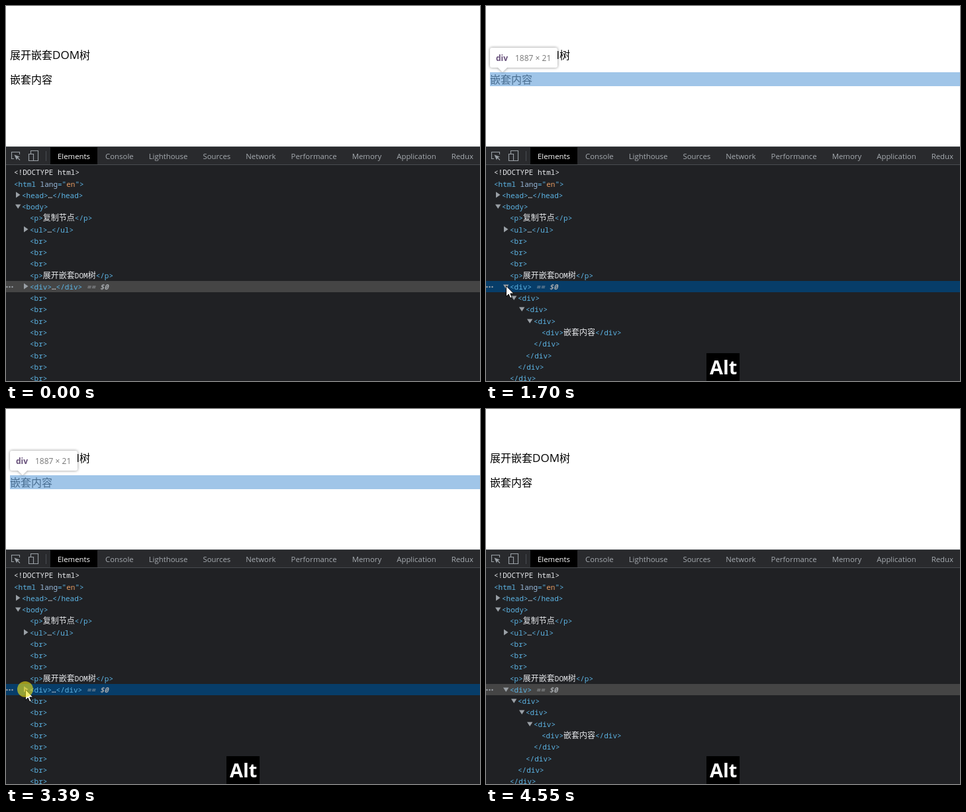
Write an HTML page that moves like this. It is 716x566 px and loops after 4600 ms.

```html
<!DOCTYPE html>
<html lang="zh-CN">
<head>
<meta charset="utf-8">
<style>
  html, body { margin: 0; width: 100%; height: 100%; overflow: hidden; background: #fff; }
  svg { display: block; width: 716px; height: 566px; }
  text { white-space: pre; }
  .page { font: 16px "Noto Sans CJK SC", "Noto Sans CJK", sans-serif; fill: #000; }
  .dom { font: 17px "Open Sans", sans-serif; }
  .tab { font: 11.4px "Open Sans", sans-serif; fill: #a6abb0; }
  .tab:first-child { fill: #fff; }
  .code { font: 11px "Noto Sans Mono", monospace; fill: #5cb4e4; }
  .cjk { font: 12px "Noto Sans CJK SC", "Noto Sans CJK", sans-serif; }
  .plain, .cjk { fill: #e8eaed; }
  .attr { fill: #9bbbdc; }
  .value { fill: #e39a62; }
  .ref { fill: #a3a7ab; font-style: italic; }
  .arrow { fill: #9aa0a6; }
  .tip { font: 12px "Open Sans", sans-serif; fill: #777; }
</style>
</head>
<body>
<svg viewBox="0 0 716 566">
  <text class="page" x="6" y="80">展开嵌套<tspan class="dom">DOM</tspan>树</text>
  <text class="page" x="6" y="117">嵌套内容</text>

  <g id="overlay">
    <rect x="6" y="100" width="710" height="21" fill="#6fa8dc" fill-opacity=".66"/>
    <g fill="#fff" style="filter:drop-shadow(0 0 2px rgba(0,0,0,.45))">
      <rect x="6" y="63" width="102" height="30" rx="3"/>
      <path d="M18 93H32L25 100Z"/>
    </g>
    <text class="tip" x="15" y="83" style="font-weight:700;fill:#67507a">div</text>
    <text class="tip" x="44" y="83">1887 × 21</text>
  </g>

  <rect y="212" width="716" height="354" fill="#202124"/>
  <rect y="212" width="716" height="28" fill="#292a2d"/>
  <path d="M0 212.5H716M0 239.5H716M60.5 219V234" stroke="#494c50"/>
  <rect x="67" y="213" width="71" height="26" fill="#000"/>
  <g fill="none" stroke="#9aa0a6" stroke-width="1.1">
    <path d="M12 230.5H8.5V220.5H20.5V224M16.5 228L21 232.5"/>
    <path d="M12.5 224.5L21 227.5L17.5 229L16 232.5Z" fill="#9aa0a6" stroke="none"/>
    <path d="M37.5 223V218.5H48.5V233.5H42M34.5 223.5H41.5V233.5H34.5Z"/>
  </g>
  <g id="tabs"></g>

  <rect id="hover" x="1" width="715" height="17" fill="#202a3a"/>
  <rect id="selected" y="415" width="716" height="17"/>
  <path d="M1.5 424h9" stroke="#9aa0a6" stroke-width="2.4" stroke-linecap="round" stroke-dasharray="0 4"/>
  <g id="tree"></g>
  <g id="closed"></g>
  <g id="open"></g>

  <g id="key">
    <rect x="333" y="524" width="50" height="42" fill="#000"/>
    <text x="338" y="556" fill="#fff" style="font:700 29px 'Open Sans',sans-serif">Alt</text>
  </g>
  <g id="cursor">
    <path d="M.5 .5V16.5L4.2 13L6.7 18.8L9.2 17.7L6.8 12H11.8Z" fill="#fff" stroke="#000" stroke-width=".9"/>
    <circle id="press" r="12" fill="#ebe119" fill-opacity=".62"/>
  </g>
</svg>
<script>
const $ = id => document.getElementById(id);
const LOOP = 4600, PITCH = 17.27, TOP = 242.6, SELECTED = 10;
const ENTER = 30, LEAVE = 3910, LAG = 60, HOLD = 100;
const clicks = [1390, 2650, 3390];

let tabX = 78;
for (const name of 'Elements Console Lighthouse Sources Network Performance Memory Application Redux'.split(' ')) {
  $('tabs').insertAdjacentHTML('beforeend', `<text class="tab" x="${tabX}" y="231">${name}</text>`);
  tabX += $('tabs').lastChild.getComputedTextLength() + 23;
}

const span = (cls, s) => `<tspan class="${cls}">${s}</tspan>`;
const escape = s => s.replace(/</g, '&lt;').replace(/>/g, '&gt;');

function colour(code) {
  if (code.startsWith('<!')) return span('plain', escape(code));
  return escape(code)
    .replace(/(lang)(=")(en)/, (m, a, b, c) => span('attr', a) + b + span('value', c))
    .replace(/[\u4e00-\u9fff]+/g, s => span('cjk', s))
    .replace(/DOM|…/g, s => span('plain', s))
    .replace(/ == \$0/, ' ' + span('ref', '== <tspan font-weight="700">$0</tspan>'));
}

// Each leading space is one indent; + marks a collapsed node, - an expanded one.
function addRows(group, first, source) {
  $(group).innerHTML = source.split('\n').map((line, i) => {
    const [, indent, mark, code] = line.match(/^( *)([+-]?)(.*)$/);
    const x = 12 + 12 * indent.length;
    const mid = Math.round(TOP + PITCH * (first + i + .5));
    const shape = { '+': `M${x - 9} ${mid - 5.5}v9l6.5-4.5z`, '-': `M${x - 10} ${mid - 3.5}h8.4l-4.2 6.5z` }[mark];
    return (shape ? `<path class="arrow" d="${shape}"/>` : '') +
      `<text class="code" x="${x}" y="${mid + 4}">${colour(code)}</text>`;
  }).join('');
}

addRows('tree', 0, `<!DOCTYPE html>
<html lang="en">
 +<head>…</head>
 -<body>
  <p>复制节点</p>
  +<ul>…</ul>
  <br>
  <br>
  <br>
  <p>展开嵌套DOM树</p>`);

addRows('closed', SELECTED, '  +<div>…</div> == $0' + '\n  <br>'.repeat(8));

addRows('open', SELECTED, `  -<div> == $0
   -<div>
    -<div>
     -<div>
      <div>嵌套内容</div>
     </div>
    </div>
   </div>
  </div>`);

// Pointer stops, eased between: time, x, y
const stops = [
  [ENTER, 170, 560], [540, 15, 421], [720, 25, 420], [1670, 26, 421], [1700, 30, 422],
  [1950, 36, 439], [2200, 35, 421], [2450, 30, 422], [2770, 30, 422],
  [2960, 34, 445], [3150, 29, 423], [3500, 29, 423], [4000, 476, 561]
];

function pointer(t) {
  if (t < ENTER || t >= LEAVE) return null;
  const n = stops.findIndex(s => s[0] > t);
  const [t0, x0, y0] = stops[n - 1], [t1, x1, y1] = stops[n];
  const f = (t - t0) / (t1 - t0), e = f * f * (3 - 2 * f);
  return { x: x0 + (x1 - x0) * e, y: y0 + (y1 - y0) * e };
}

const show = (id, on) => $(id).setAttribute('visibility', on ? 'inherit' : 'hidden');

function draw(t) {
  const open = clicks.filter(c => t >= c + HOLD).length % 2 === 1;
  const pos = pointer(t), late = pointer(t - LAG);
  const row = late ? Math.floor((late.y - TOP) / PITCH) : -1;

  show('open', open);
  show('closed', !open);
  show('overlay', row === SELECTED || open && row > SELECTED);
  show('hover', row >= 0 && row !== SELECTED);
  $('hover').setAttribute('y', Math.round(TOP + PITCH * row));
  $('selected').setAttribute('fill', t >= clicks[0] && t < 4550 ? '#073d69' : '#454545');
  show('key', t >= 850);
  show('cursor', pos);
  show('press', pos && clicks.some(c => t >= c && t < c + HOLD));
  if (pos) $('cursor').setAttribute('transform', `translate(${Math.round(pos.x)} ${Math.round(pos.y)})`);
}

function tick() {
  draw(performance.now() % LOOP);
  requestAnimationFrame(tick);
}
tick();
</script>
</body>
</html>
```
